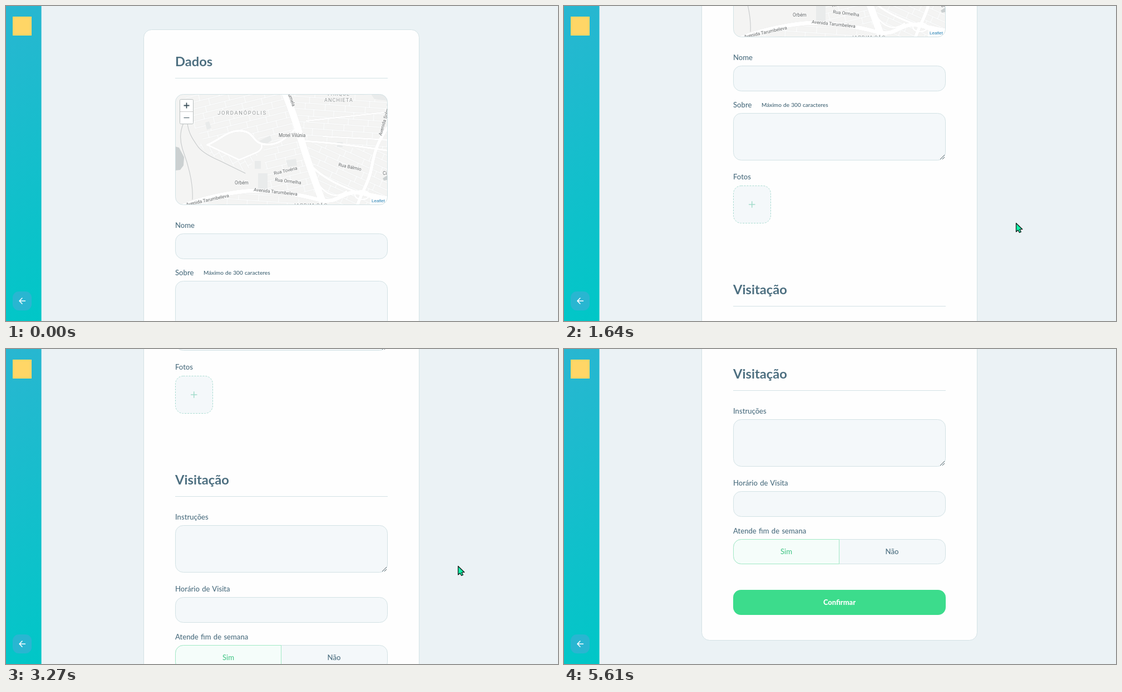
These frames come from a looping animation (992x565 px, 6.37 s). An HTML page:

```html
<!DOCTYPE html>
<html lang="pt">
<head>
<meta charset="utf-8">
<title>Dados</title>
<style>
html, body { margin: 0; width: 992px; height: 565px; overflow: hidden; background: #ebf2f5; }
svg { display: block; font: 500 13.1px Lato, sans-serif; word-spacing: 1px; }
text { fill: #4d6f80; }
.title { font-size: 23.7px; font-weight: 700; }
.hint { font-size: 10.1px; word-spacing: .6px; fill: #3f6273; }
.mid text { text-anchor: middle; }
.card, .field, .frame { stroke: #d3e2e5; }
.card { fill: #fefefe; }
.field, .frame { x: 304.5px; width: 381px; rx: 14px; }
.field { height: 45px; fill: #f4f8fa; }
.area { height: 84px; }
.frame { y: 158.5px; height: 198px; fill: none; }
.rule { stroke: #d3e2e5; }
.grip { fill: none; stroke: #566066; }
.line { fill: none; stroke-linecap: round; stroke-linejoin: round; }
.casing { stroke: #e6e7e7; }
.road { stroke: #fff; }
.rail { stroke: #c6c9ca; stroke-width: 1.1; }
.park { fill: #e9ebeb; }
.lake { fill: #cbd0d1; }
.places text { font: 8.3px Roboto, sans-serif; word-spacing: 0; fill: #666a6b; stroke: #fafafa; stroke-width: 2px; paint-order: stroke; }
.places .zone { font-size: 9px; letter-spacing: 1.1px; fill: #969a9a; text-anchor: middle; }
.places .wide { font-size: 9.4px; letter-spacing: 1.7px; }
</style>
</head>
<body>
<svg width="992" height="565" viewBox="0 0 992 565">
  <defs>
    <linearGradient id="side" gradientUnits="userSpaceOnUse" x1="-100" y1="59" x2="163" y2="506">
      <stop stop-color="#29b6d1"/><stop offset="1" stop-color="#00c7c7"/>
    </linearGradient>
    <clipPath id="mapClip"><rect x="304.5" y="158.5" width="381" height="198" rx="14"/></clipPath>
    <path id="streets" class="line" d="M0 0H36M0 11H36M0 23H36M9 0V11M25 11V23M16 23V34M0 34H36"/>
    <g id="block">
      <use href="#streets" class="casing" stroke-width="2.3"/>
      <use href="#streets" class="road" stroke-width="1.5"/>
    </g>
    <pattern id="gridA" width="36" height="34" patternUnits="userSpaceOnUse" patternTransform="rotate(-14)"><use href="#block"/></pattern>
    <pattern id="gridB" width="36" height="34" patternUnits="userSpaceOnUse" patternTransform="rotate(4)"><use href="#block"/></pattern>
    <pattern id="gridC" width="36" height="34" patternUnits="userSpaceOnUse" patternTransform="rotate(62)"><use href="#block"/></pattern>
    <pattern id="gridD" width="36" height="34" patternUnits="userSpaceOnUse" patternTransform="rotate(24)"><use href="#block"/></pattern>
  </defs>

  <g id="page">
    <rect class="card" x="247.5" y="42.5" width="495" height="1245" rx="14"/>
    <text class="title" x="304" y="107.5">Dados</text>
    <path class="rule" d="M304 129.5H686M304 839.5H686"/>

    <g clip-path="url(#mapClip)">
      <path fill="#f4f4f3" d="M304 158h382v199H304z"/>
      <path fill="url(#gridA)" d="M322 158H498L522 224L470 246L424 222L360 248L330 205z"/>
      <path fill="url(#gridB)" d="M504 158H686V260L535 242z"/>
      <path fill="url(#gridC)" d="M340 245L364 249L420 275L456 260L432 298L370 268z"/>
      <path fill="url(#gridA)" d="M462 249L522 226L562 335L470 330z"/>
      <path fill="url(#gridD)" d="M538 245L686 262V357H580L550 290z"/>
      <path fill="url(#gridB)" d="M350 350L440 336L560 350V360H350z"/>
      <path class="park" d="M455 242L475 232L478 241L465 249zM447 278h11v14h-11zM453 300h17v28h-17zM358 209l7-2 4 12-8 3zM656 158h30v12l-24-3zM503 277l18-3 2 12-16 3zM595 244h10v9h-10z"/>
      <path class="lake" d="M304 252l7 2 9 17-1 15-6 8-9 1zM677 309l8-5v8l-6 1z"/>
      <path class="line rail" d="M319 210C311 228 313 246 319 262S337 315 335 347M326 210C328 230 338 242 344 251S364 269 385 278L430 300"/>
      <g class="line road" style="filter:drop-shadow(0 0 .5px #d4d4d4)">
        <path stroke-width="13" d="M499 150Q516 190 529 235T573 362"/>
        <path stroke-width="6" d="M692 210C668 240 662 262 657 290S638 335 630 362"/>
        <path stroke-width="7.5" d="M314 360C350 345 400 335 432 332S520 336 560 347S602 328 640 336L690 346"/>
        <path stroke-width="4" d="M362 249C385 240 400 221 424 224S442 245 464 248S498 241 519 222"/>
        <path stroke-width="3.5" d="M362 249L419 276L452 262Q462 256 459 247"/>
        <path stroke-width="3.5" d="M533 242Q600 246 690 260"/>
        <path stroke-width="4" d="M549 287C575 314 615 330 690 354"/>
        <path stroke-width="3" d="M627 339a13 8 0 1 0 26 0a13 8 0 1 0-26 0M560 318Q585 352 612 332"/>
        <path stroke-width="2.5" d="M522 214Q515 205 506 180M570 234L690 240M540 206L690 190"/>
      </g>
      <g class="places">
        <text class="zone wide" x="424.5" y="194.5">JORDANÓPOLIS</text>
        <text class="zone" x="598" y="160.5">PARQUE</text>
        <text class="zone" x="598" y="172">ANCHIETA</text>
        <text class="zone" x="547" y="361">JARDIM SÃO</text>
        <text x="490" y="234.5">Motel Vilúnia</text>
        <text x="411" y="320">Orbém</text>
        <text x="677" y="303">Ci</text>
        <text transform="translate(482 303) rotate(-13)">Rua Tovéria</text>
        <text transform="translate(483 314) rotate(7)">Rua Ormelha</text>
        <text transform="translate(597 287) rotate(12)">Rua Bálmio</text>
        <text transform="translate(445 332) rotate(6)">Avenida Tarumbeleva</text>
        <text transform="translate(324 359) rotate(-12)">Avenida Tarumbeleva</text>
        <text transform="translate(675 233) rotate(-74)">Avenida Solmeira</text>
        <text transform="translate(507 159) rotate(70)">umela</text>
      </g>
      <path fill="#fff" fill-opacity=".7" d="M654 343h32v14h-32z"/>
      <text x="657" y="352" style="font:8px 'Liberation Sans',sans-serif;fill:#2481b5">Leaflet</text>
      <rect x="312.5" y="167.5" width="24" height="44" rx="2" fill="#fff" stroke="#b9bfbf"/>
      <path stroke="#ccc" d="M313 189.5h23"/>
      <path stroke="#3d525c" stroke-width="1.8" d="M319.5 178.5h10M324.5 173.5v10"/>
      <path stroke="#3d525c" stroke-width="1.2" d="M319.5 200.5h10"/>
    </g>
    <rect class="frame"/>

    <text x="304" y="397.5">Nome</text>
    <rect class="field" y="408.5"/>
    <text x="304" y="482.5">Sobre</text>
    <text class="hint" x="355" y="481.5">Máximo de 300 caracteres</text>
    <rect class="field area" y="493.5"/>
    <path id="grip" class="grip" d="M676 576l8-8M680 576l4-4"/>
    <text x="304" y="612">Fotos</text>
    <rect x="304.5" y="623.5" width="67" height="67" rx="14" fill="#f4f8fa" stroke="#a9dcd2" stroke-dasharray="3 2"/>
    <path stroke="#a3dccb" stroke-width="1.5" d="M332 657h11.5M337.750 651.250v11.5"/>

    <text class="title" x="304" y="818">Visitação</text>
    <text x="304" y="880.5">Instruções</text>
    <rect class="field area" y="891.5"/>
    <use href="#grip" y="398"/>
    <text x="304" y="1010">Horário de Visita</text>
    <rect class="field" y="1020.5"/>
    <text x="304" y="1095.5">Atende fim de semana</text>
    <rect class="field" y="1106.5" style="height:44px"/>
    <path fill="#f5fdfa" stroke="#a1e9c5" d="M494.5 1106.5H318.5a14 14 0 0 0-14 14v16a14 14 0 0 0 14 14H494.5z"/>
    <g class="mid">
      <text x="399.5" y="1133" style="fill:#4cc88c">Sim</text>
      <text x="589.5" y="1133">Não</text>
      <rect x="304" y="1197" width="382" height="45" rx="14" fill="#3cdc8c"/>
      <text x="495" y="1224" style="font-size:12.9px;font-weight:800;fill:#fff">Confirmar</text>
    </g>
  </g>

  <path fill="url(#side)" d="M0 0h63.6v565H0z"/>
  <path fill="#ffd666" d="M12 19h34v34H12z"/>
  <rect x="12" y="512" width="34" height="34" rx="11" fill="#29b6d1"/>
  <path class="line" stroke="#fff" stroke-width="1.5" d="M34.5 529H24M29 524l-5 5 5 5"/>

  <path id="cursor" fill="#12f0a8" stroke="#111" stroke-width="1.2" stroke-linejoin="round" d="M.5 .5V16L4 13l2.5 4.5 2.8-1.3L7 11.5h4.8z"/>
</svg>
<script>
const LOOP = 6370;
const page = document.getElementById('page');
const cursor = document.getElementById('cursor');

// Each run holds its values one after another, a fixed gap apart.
const scrollRuns = [
  { start: 860, gap: 78, values: [3, 22, 60, 108, 158, 203, 241, 270, 291, 298, 301] },
  { start: 2410, gap: 78.3, values: [305, 328, 370, 420, 470, 510, 539, 556, 566, 572, 575, 577, 578] },
  { start: 4050, gap: 76, values: [581, 608, 660, 712, 750, 765] }
];
const away = [-50, -50];
const cursorRuns = [
  { start: 290, gap: 85, values: [[872, 538], [822, 408], [812, 389]] },
  { start: 5130, gap: 80, values: [[814, 393], [822, 410], [838, 438], [862, 474], [892, 512], [922, 548], away] }
];

function valueAt(t, runs, rest) {
  const run = runs.filter(r => r.start <= t).pop();
  if (!run) return rest;
  const step = Math.floor((t - run.start) / run.gap);
  return run.values[Math.min(step, run.values.length - 1)];
}

const begin = performance.now();
function draw() {
  const t = (performance.now() - begin) % LOOP;
  page.setAttribute('transform', `translate(0 ${-valueAt(t, scrollRuns, 0)})`);
  cursor.setAttribute('transform', `translate(${valueAt(t, cursorRuns, away)})`);
  requestAnimationFrame(draw);
}
draw();
</script>
</body>
</html>
```
